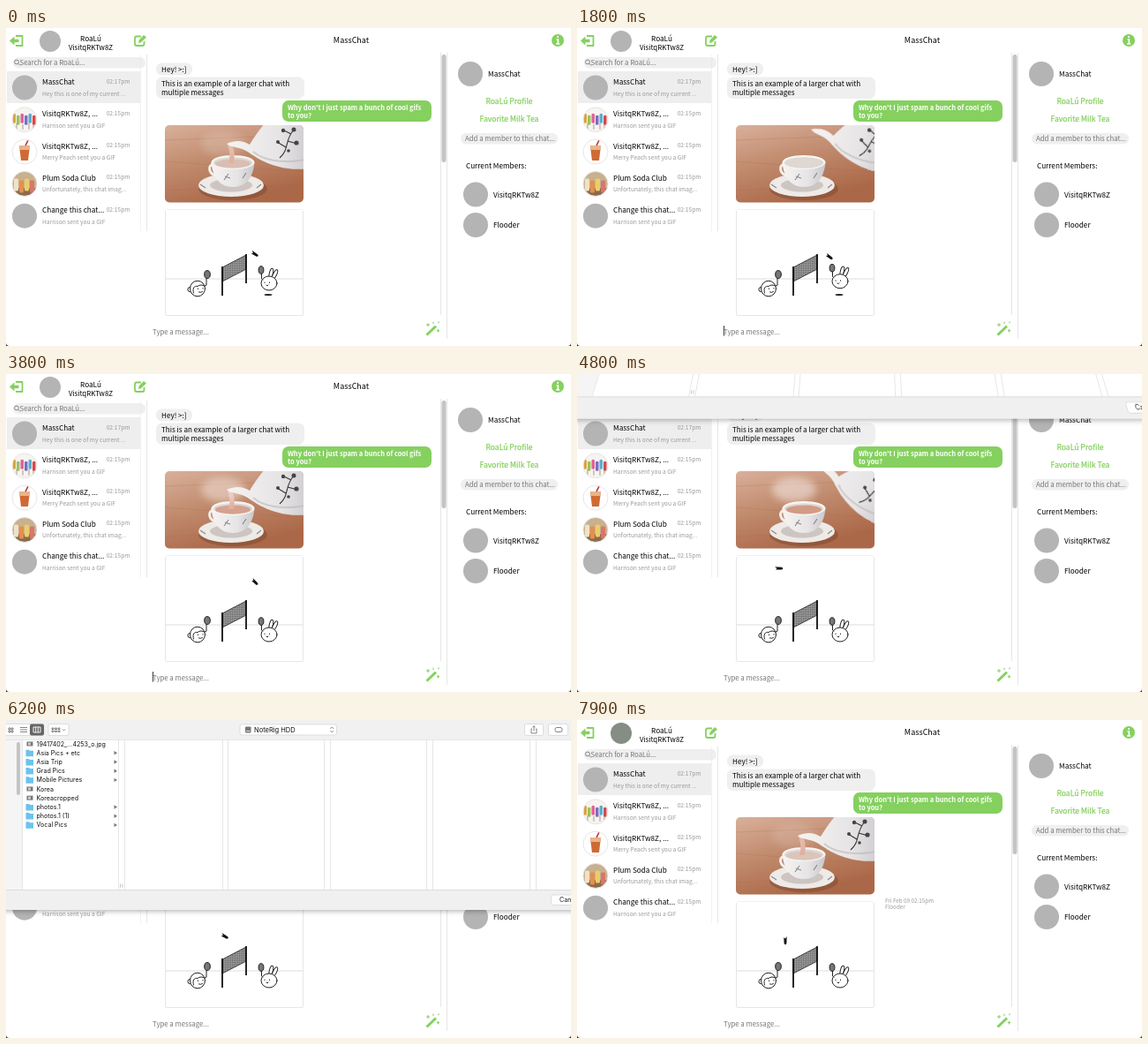
These frames come from a looping animation (640 px wide and 360 px high, 8000 ms). An HTML page:

```html
<!DOCTYPE html>
<html lang="en">
<head>
<meta charset="utf-8">
<title>Chat window</title>
<style>
html, body { margin: 0; width: 100%; height: 100%; overflow: hidden; background: #333; }
#stage { position: relative; width: 640px; height: 360px; overflow: hidden; border-radius: 0 0 4px 4px; background: #fff; }
svg { display: block; }
text { font: 8.1px "Noto Sans CJK JP", "Noto Sans CJK SC", "Noto Sans CJK", "Noto Sans", sans-serif; fill: #000; white-space: pre; }
.mid { text-anchor: middle; }
.end { text-anchor: end; }
.name { font-size: 8.2px; }
.title { font-size: 9px; }
.hint { font-size: 7.8px; fill: #777; }
.note { font-size: 6.65px; fill: #999; }
.link { font-size: 8.6px; fill: #85d05f; stroke: #85d05f; stroke-width: .25; }
.mine { font-weight: 700; font-size: 7.5px; fill: #fff; }
.pill { fill: #efefef; }
.mark { fill: #b4b4b4; }
.rule { stroke: #e6e6e6; fill: none; }
.ink { stroke: #222; fill: #fff; stroke-width: 1; stroke-linecap: round; stroke-linejoin: round; }
.green { fill: #85d05f; }
.gline { stroke: #85d05f; fill: none; stroke-width: 1.8; stroke-linejoin: round; }

.caret, .stamp, #me, #pot, .stream, .tea, #sheet, .cols, .preview { animation: 8s linear infinite; }
.caret { animation-name: caret; animation-timing-function: step-end; }
@keyframes caret {
  0%, 23.75%, 36.25%, 48.75%, 58.75% { opacity: 0; }
  17.5%, 30%, 42.5%, 55% { opacity: 1; }
}
.stamp { animation-name: stamp; animation-timing-function: step-end; }
@keyframes stamp { 0% { opacity: 0; } 93.75%, 100% { opacity: 1; } }
#me { animation-name: me; animation-timing-function: step-end; }
@keyframes me { 0% { fill: #b4b4b4; } 54%, 100% { fill: #858d85; } }

#pot { transform-origin: 305px 130px; animation-name: pot; }
@keyframes pot {
  0%, 11.25%, 31.25%, 50%, 95%, 100% { transform: translate(0, 0) rotate(0deg); }
  13.75%, 18.74%, 53.75%, 88.74% { transform: translate(18px, -2px) rotate(28deg); }
  18.75%, 27.5%, 88.75%, 91.5% { transform: translate(14px, -3px) rotate(14deg); }
}
.stream { animation-name: stream; }
@keyframes stream {
  0%, 11.25%, 31.25%, 50%, 95%, 100% { opacity: 1; }
  11.6%, 30.6%, 50.4%, 94.4% { opacity: 0; }
}
.tea { animation-name: tea; }
@keyframes tea {
  0%, 100% { opacity: .4; }
  11.25%, 18.74%, 50%, 88.74% { opacity: 1; }
  18.75%, 31.25%, 88.75%, 95% { opacity: 0; }
}

#sheet {
  position: absolute; left: -100px; top: 0; width: 840px; height: 215px; background: #fff;
  box-shadow: 0 1px 6px rgba(0, 0, 0, .35); transform-origin: 50% 100%;
  animation-name: sheet; animation-timing-function: ease-in-out;
}
@keyframes sheet {
  0%, 58.125%, 90.8%, 100% { visibility: hidden; transform: translateY(-215px) perspective(440px) rotateX(31deg) scale(1.04, 1.3); }
  63.75%, 85.175% { visibility: visible; transform: translateY(0) perspective(440px) rotateX(0deg) scale(1, 1); }
}
.cols { animation-name: cols; animation-timing-function: step-end; }
@keyframes cols { 0% { opacity: 1; } 81.25%, 100% { opacity: 0; } }
.preview { animation-name: preview; animation-timing-function: step-end; }
@keyframes preview { 0% { opacity: 0; } 81.25%, 100% { opacity: 1; } }
#sheet text { font-family: Inter, Roboto, sans-serif; font-size: 7.1px; fill: #111; }
#sheet .big { font-size: 9.6px; fill: #000; }
#sheet .soft { fill: #999; }
.btn { fill: #fff; stroke: #d2d2d2; stroke-width: .7; }
.glyph { stroke: #777; fill: none; stroke-width: .9; }
</style>
</head>
<body>
<div id="stage">
<svg width="640" height="360" viewBox="0 0 640 360">
  <defs>
    <clipPath id="photo"><rect x="180" y="110" width="157" height="87.5" rx="5"/></clipPath>
    <clipPath id="face"><circle r="14"/></clipPath>
    <linearGradient id="wood" x1="0" y1="0" x2=".45" y2="1">
      <stop offset="0" stop-color="#d9b09a"/><stop offset=".5" stop-color="#c08a6d"/><stop offset="1" stop-color="#ab6848"/>
    </linearGradient>
    <linearGradient id="china" x1="0" x2="1">
      <stop offset="0" stop-color="#f6f3f1"/><stop offset=".6" stop-color="#e6e4e5"/><stop offset="1" stop-color="#c9c7ca"/>
    </linearGradient>
    <pattern id="mesh" width="2" height="2" patternUnits="userSpaceOnUse">
      <rect width="2" height="2" fill="#aaa"/><path d="M0 0H2M0 0V2" stroke="#555" stroke-width=".9"/>
    </pattern>
    <filter id="blur" x="-50%" y="-50%" width="200%" height="200%"><feGaussianBlur stdDeviation="4"/></filter>
  </defs>

  <!-- left column -->
  <path class="gline" d="M11 9H18.5V20H11"/>
  <path class="green" d="M4 14.5L9.5 9.5V12.7H14.5V16.3H9.5V19.5Z"/>
  <circle id="me" cx="50" cy="15" r="12"/>
  <text class="mid name" x="96" y="14.5">RoaLú</text>
  <text class="mid" x="96" y="24.5" style="font-size:7.9px">VisitqRKTw8Z</text>
  <path class="gline" d="M153 9.5H148Q146 9.5 146 11.5V18Q146 20 148 20H154.5Q156.5 20 156.5 18V15"/>
  <path class="green" d="M150 17L150.6 13.8L156 8L159 10.5L153 16.3Z"/>
  <rect class="pill" x="8" y="33" width="150" height="12.5" rx="6"/>
  <g fill="none" stroke="#777" stroke-width=".9"><circle cx="12" cy="38.5" r="2.4"/><path d="M13.8 40.3L16 42.5"/></g>
  <text class="hint" x="15.5" y="42">Search for a RoaLú...</text>
  <rect x="1" y="49" width="151" height="36" fill="#eee"/>
  <g id="chats"></g>
  <path class="rule" d="M152.5 30V230" opacity=".5"/>
  <path class="rule" d="M159.5 30V230"/>

  <!-- conversation -->
  <text class="mid title" x="391" y="17">MassChat</text>
  <rect class="pill" x="170" y="39.5" width="41" height="14" rx="6.5"/>
  <text x="176" y="49.5">Hey! &gt;:]</text>
  <rect class="pill" x="170" y="55.5" width="168" height="24.5" rx="7"/>
  <text x="176" y="66">This is an example of a larger chat with</text>
  <text x="176" y="75.5">multiple messages</text>
  <rect class="green" x="313" y="82" width="169" height="24" rx="7"/>
  <text class="mine" x="319" y="92.5">Why don't I just spam a bunch of cool gifs</text>
  <text class="mine" x="319" y="102">to you?</text>

  <g clip-path="url(#photo)">
    <rect x="180" y="110" width="157" height="88" fill="url(#wood)"/>
    <path d="M180 127L337 121M180 151L337 163M180 184L337 177" stroke="#a9684a" stroke-width=".6" opacity=".4"/>
    <ellipse cx="257" cy="182" rx="39" ry="13" fill="#7d4830" opacity=".5"/>
    <ellipse cx="255" cy="178" rx="37" ry="13" fill="#eeeae7"/>
    <ellipse cx="255" cy="178" rx="24" ry="7.5" fill="#cdc5c1"/>
    <path d="M237 155C227 152 229 168 240 167" fill="none" stroke="#f2efed" stroke-width="3"/>
    <path d="M232.5 152C234 169 242 180 257 180C272 180 280 169 281.5 152Z" fill="url(#china)"/>
    <ellipse cx="257" cy="152" rx="24.5" ry="8" fill="#f7f5f3"/>
    <ellipse cx="257" cy="152.5" rx="22" ry="6.3" fill="#ded7d2"/>
    <ellipse class="tea" cx="257" cy="153.5" rx="20" ry="5" fill="#d39a85"/>
    <path d="M247 172L252 165M248 168L254 170M268 170L272 164M220 177L226 181M284 181L289 177" stroke="#555" stroke-width="1.1" opacity=".65"/>
    <path class="stream" d="M251 131C258 132 260 139 258 153H252C255 142 252 138 251 131Z" fill="#e0b09f"/>
    <ellipse class="tea" cx="246" cy="131" rx="25" ry="14" fill="#fff" fill-opacity=".45" filter="url(#blur)"/>
    <g id="pot">
      <path d="M250 131C262 126 268 128 276 132C283 120 290 112 296 104L350 72V158C324 163 305 157 292 151C280 146 274 138 264 136C258 134 254 135 250 131Z" fill="url(#china)"/>
      <path d="M280 140C290 149 312 155 345 148" fill="none" stroke="#bcb8b8" stroke-width="2" opacity=".6"/>
      <path d="M310 147C321 138 315 128 326 115M317 135L307 129M319 128L330 131M323 120L313 115" fill="none" stroke="#333" stroke-width="1.1"/>
      <g fill="#444"><circle cx="308" cy="129" r="2"/><circle cx="329" cy="130" r="2.6"/><circle cx="314" cy="116" r="2.2"/><circle cx="326" cy="115" r="2.5"/><circle cx="320" cy="139" r="1.8"/></g>
    </g>
  </g>

  <path class="rule" d="M180.5 325V207M336.5 207V325M181 325.5H336"/>
  <path class="rule" d="M181 205.5H336" opacity=".5"/>
  <path d="M181 284H336" stroke="#ddd"/>
  <g id="ape">
    <circle class="ink" cx="208.5" cy="296" r="2.6"/>
    <ellipse class="ink" cx="217" cy="295" rx="8.5" ry="8.8"/>
    <path class="ink" d="M212.5 300C211 295 213 291.5 217 292.5C219 290.5 223 290.5 224.5 292"/>
    <path class="ink" d="M217.5 295V295.5M223 294.5V295M218.5 299Q220.5 300 222.5 298.5M225 292L227 291V283"/>
    <ellipse cx="228" cy="279" rx="3.3" ry="4.4" fill="#777" stroke="#222"/>
  </g>
  <g id="hare">
    <ellipse class="ink" cx="300.5" cy="283.5" rx="2" ry="5.5" transform="rotate(14 300 283)"/>
    <ellipse class="ink" cx="304.5" cy="285" rx="2" ry="6" transform="rotate(26 304 285)"/>
    <ellipse class="ink" cx="298" cy="295" rx="9" ry="8"/>
    <path class="ink" d="M293 294V294.5M298.5 294V294.5M295 297L296 298L297 297M291 291L289.5 290V284"/>
    <ellipse cx="289" cy="280" rx="2.9" ry="4.3" fill="#777" stroke="#222"/>
  </g>
  <ellipse id="apeShade" cx="217" cy="301.5" rx="4.5" ry="1.1" fill="#222"/>
  <ellipse id="hareShade" cx="297" cy="302" rx="4.5" ry="1.1" fill="#222"/>
  <path d="M245 271L272 257V273L245 287Z" fill="url(#mesh)" stroke="#222" stroke-width=".8"/>
  <path d="M245 270V303M272 256V289" stroke="#111" stroke-width="1.8"/>
  <path id="bird" d="M-5 -1.8L3 -1.3Q5.5 0 3 1.5L-4 1.6L-2.5 0Z" fill="#111"/>

  <g class="stamp">
    <text class="note" x="349" y="207" style="font-size:6.3px">Fri Feb 09 02:15pm</text>
    <text class="note" x="349" y="214" style="font-size:6.3px">Flooder</text>
  </g>
  <path class="rule" d="M492.5 28V325M499.5 28V352"/>
  <rect x="493.5" y="30" width="5" height="122" rx="2.5" fill="#c4c4c4"/>
  <text class="hint" x="166" y="346.5">Type a message...</text>
  <path class="caret" d="M166.5 337V348.5" stroke="#222" stroke-width=".9"/>
  <path d="M476.5 347.5L487 337.5" stroke="#85d05f" stroke-width="3"/>
  <path d="M478 334V338M476 336H480M484 332.5V335M489.5 341V344.5M487.8 342.7H491.3M489 334L491 332.5" stroke="#85d05f" stroke-width="1"/>

  <!-- right column -->
  <circle class="green" cx="625" cy="14" r="7"/>
  <path d="M625 9V11M623.5 13H625.3V18M623 18H627.3" stroke="#fff" stroke-width="1.7" fill="none"/>
  <circle class="mark" cx="526" cy="52" r="14"/>
  <text class="name" x="546" y="55">MassChat</text>
  <text class="link mid" x="570" y="86">RoaLú Profile</text>
  <text class="link mid" x="570" y="105.5">Favorite Milk Tea</text>
  <rect class="pill" x="515" y="119" width="110" height="12.5" rx="6"/>
  <text class="hint" x="520" y="128">Add a member to this chat...</text>
  <text class="name" x="521" y="159">Current Members:</text>
  <circle class="mark" cx="532" cy="188.5" r="14"/>
  <text class="name" x="552" y="191.5">VisitqRKTw8Z</text>
  <circle class="mark" cx="532" cy="223" r="14"/>
  <text class="name" x="552" y="226">Flooder</text>
</svg>

<div id="sheet">
<svg width="840" height="215" viewBox="-100 0 840 215">
  <rect x="-100" width="840" height="22" fill="#f1f1f1"/>
  <rect x="-100" y="22" width="118" height="170" fill="#f5f5f5"/>
  <rect x="12" y="25" width="4" height="60" rx="2" fill="#c4c4c4"/>
  <path class="rule" d="M-100 22.5H740M18.5 22V192M127.5 22V192M134.5 22V192"/>
  <path d="M129.5 185.5V189.5M132 185.5V189.5" stroke="#aaa" stroke-width=".7"/>
  <rect class="btn" x="-4" y="4.5" width="47" height="13" rx="2"/>
  <rect x="27" y="4.5" width="16" height="13" rx="2" fill="#666"/>
  <path class="glyph" d="M3 9H5V11H3ZM6 9H8V11H6ZM3 12H5V14H3ZM6 12H8V14H6ZM16 8.5H24M16 11H24M16 13.5H24"/>
  <path d="M31 8H39V14H31ZM33.7 8V14M36.3 8V14" fill="none" stroke="#fff" stroke-width=".9"/>
  <rect class="btn" x="48" y="4.5" width="23" height="13" rx="2"/>
  <path class="glyph" d="M52 9H54V10.5H52ZM55.5 9H57.5V10.5H55.5ZM59 9H61V10.5H59ZM52 12H54V13.5H52ZM55.5 12H57.5V13.5H55.5ZM59 12H61V13.5H59ZM64 10.5L65.5 12L67 10.5"/>
  <rect class="btn" x="265" y="5" width="109.5" height="12" rx="2.5"/>
  <rect x="271" y="7.5" width="6.5" height="7" rx="1" fill="#777"/><path d="M272 12.5H276.5" stroke="#ddd"/>
  <text x="281" y="13.6" style="font-size:7.5px">NoteRig HDD</text>
  <path class="glyph" d="M367.5 9.8L369.2 8L371 9.8M367.5 12.2L369.2 14L371 12.2"/>
  <rect class="btn" x="587.5" y="4.5" width="21" height="13" rx="2"/>
  <path class="glyph" d="M596 10H595V15H601V10H600M598 12.5V6.8M596.5 8.3L598 6.8L599.5 8.3"/>
  <rect class="btn" x="614.5" y="4.5" width="22" height="13" rx="2"/>
  <rect class="glyph" x="622" y="8.5" width="8" height="5" rx="2"/>
  <g id="files"></g>
  <path class="cols rule" d="M245.5 22V192M251.5 22V192M360.5 22V192M367.5 22V192M476.5 22V192M483.5 22V192M593.5 22V192M600.5 22V192"/>
  <g class="preview">
    <text class="big mid" x="423" y="149">19417402_10212723773556693_2008502956161264253_o.jpg</text>
    <text class="soft" x="370" y="174">JPEG image - 152 KB</text>
    <text class="soft end" x="365" y="184">Created</text>
    <text x="370" y="184">Thursday, September 21, 2017 at 6:40 PM</text>
    <text class="soft end" x="365" y="193.5">Modified</text>
    <text x="370" y="193.5">Thursday, September 21, 2017 at 6:40 PM</text>
  </g>
  <rect x="-100" y="192" width="840" height="23" fill="#f0f0f0"/>
  <path d="M-100 192.5H740" stroke="#dcdcdc"/>
  <rect class="btn" x="617.5" y="198" width="43" height="11.5" rx="2.5"/>
  <text x="627" y="206.3">Cancel</text>
</svg>
</div>
</div>

<script>
const $ = id => document.getElementById(id);

const plain = '<circle class="mark" r="14"/>';
const disc = (fill, inner) =>
  `<circle r="14" fill="${fill}"/><g clip-path="url(#face)">${inner}</g><circle r="14" class="rule"/>`;
const bars = (colors, step, y, h) => colors.map((c, i) =>
  `<rect x="${(i - colors.length / 2) * step}" y="${y + i % 2 * 2}" width="${step - 1}" height="${h}" rx="1.5" fill="${c}"/>`).join('');
const wigs = disc('#f7f4f0', bars(['#d9a441', '#9bc35a', '#e0639a', '#7a6fc0', '#59aed0', '#d7484b'], 4.5, -7, 11)
  + '<path d="M-9 4V11M-2 5V11M5 4V11M10 5V10" stroke="#a98" stroke-width="1"/>');
const drink = disc('#fff', '<path d="M-6 -7H6L4 10H-4Z" fill="#cf6a34"/><path d="M-6 -7H6L5.5 -2H-5.5Z" fill="#e9b48a"/><path d="M1 -7L4 -13" stroke="#b33" stroke-width="1.5"/>');
const trio = disc('#c9b08f', '<rect x="-14" y="5" width="28" height="9" fill="#8c6a4b"/>'
  + bars(['#f0e3c4', '#e58f4f', '#e8cf6a', '#d9756c'], 6, -6, 14));

const chats = [
  ['MassChat', '02:17pm', 'Hey this is one of my current ...', plain],
  ['VisitqRKTw8Z, ...', '02:15pm', 'Harrison sent you a GIF', wigs],
  ['VisitqRKTw8Z, ...', '02:15pm', 'Merry Peach sent you a GIF', drink],
  ['Plum Soda Club', '02:15pm', 'Unfortunately, this chat imag...', trio],
  ['Change this chat...', '02:15pm', 'Harrison sent you a GIF', plain],
];
$('chats').innerHTML = chats.map(([name, time, note, face], i) => `
  <g transform="translate(0 ${i * 36.3})">
    <g transform="translate(21 67.5)">${face}</g>
    <text class="name" x="41" y="64">${name}</text>
    <text class="note end" x="140.5" y="62.5">${time}</text>
    <text class="note" x="41" y="76.5">${note}</text>
  </g>`).join('');

const files = ['19417402_...4253_o.jpg', 'Asia Pics + etc', 'Asia Trip', 'Grad Pics', 'Mobile Pictures',
  'Korea', 'Koreacropped', 'photos.1', 'photos.1 (1)', 'Vocal Pics'];
const images = [0, 5, 6];
const folder = '<path d="M22.5 -6H26L27 -5H31V1.5H22.5Z" fill="#6cc3ee"/>';
const arrow = '<path d="M122.5 -4.6L126 -2.4L122.5 -.2Z" fill="#777"/>';
const picture = '<rect x="23.5" y="-5" width="7" height="5" fill="#777"/><rect x="25" y="-4" width="3" height="3" fill="#ccc"/>';
$('files').innerHTML = files.map((name, i) => `
  <g transform="translate(0 ${29.5 + i * 10.2})">
    ${images.includes(i) ? picture : folder + arrow}<text x="34.5" y="0">${name}</text>
  </g>`).join('');

// One rally: time, x, y, angle of the shuttlecock.
const RALLY = 1755;
const path = [
  [0, 282, 256, 32], [45, 286, 259, 35], [100, 289, 266, 50], [350, 280, 226, 40],
  [600, 264, 218, 0], [835, 248, 245, 30], [880, 236, 250, 88], [1045, 230, 257, 118],
  [1100, 229, 266, 110], [1290, 229, 220, 0], [1500, 250, 216, 10], [1650, 270, 236, 28], [RALLY, 282, 256, 32],
];

function birdAt(p) {
  const i = path.findIndex(k => k[0] > p);
  const a = path[i - 1], b = path[i];
  const u = (p - a[0]) / (b[0] - a[0]);
  return a.map((v, k) => v + (b[k] - v) * u);
}

// The game stalls while the sheet loads, then catches up.
function gameTime(t) {
  if (t < 5200 || t >= 7000) return t;
  return 5200 + Math.max(0, t - 5400) * 1.125;
}

function hop(p, peak) {
  const d = (p - peak + RALLY * 1.5) % RALLY - RALLY / 2;
  return 8.5 * Math.max(0, 1 - (d / 65) ** 2);
}

function jump(who, h) {
  $(who).setAttribute('transform', `translate(0 ${-h})`);
  $(who + 'Shade').setAttribute('opacity', h > 1 ? 1 : 0);
}

let start;
function draw(now) {
  start ??= now;
  const p = gameTime((now - start) % 8000) % RALLY;
  const [, x, y, angle] = birdAt(p);
  $('bird').setAttribute('transform', `translate(${x} ${y}) rotate(${angle})`);
  jump('hare', hop(p, 35));
  jump('ape', hop(p, 1060));
  requestAnimationFrame(draw);
}
requestAnimationFrame(draw);
</script>
</body>
</html>
```
